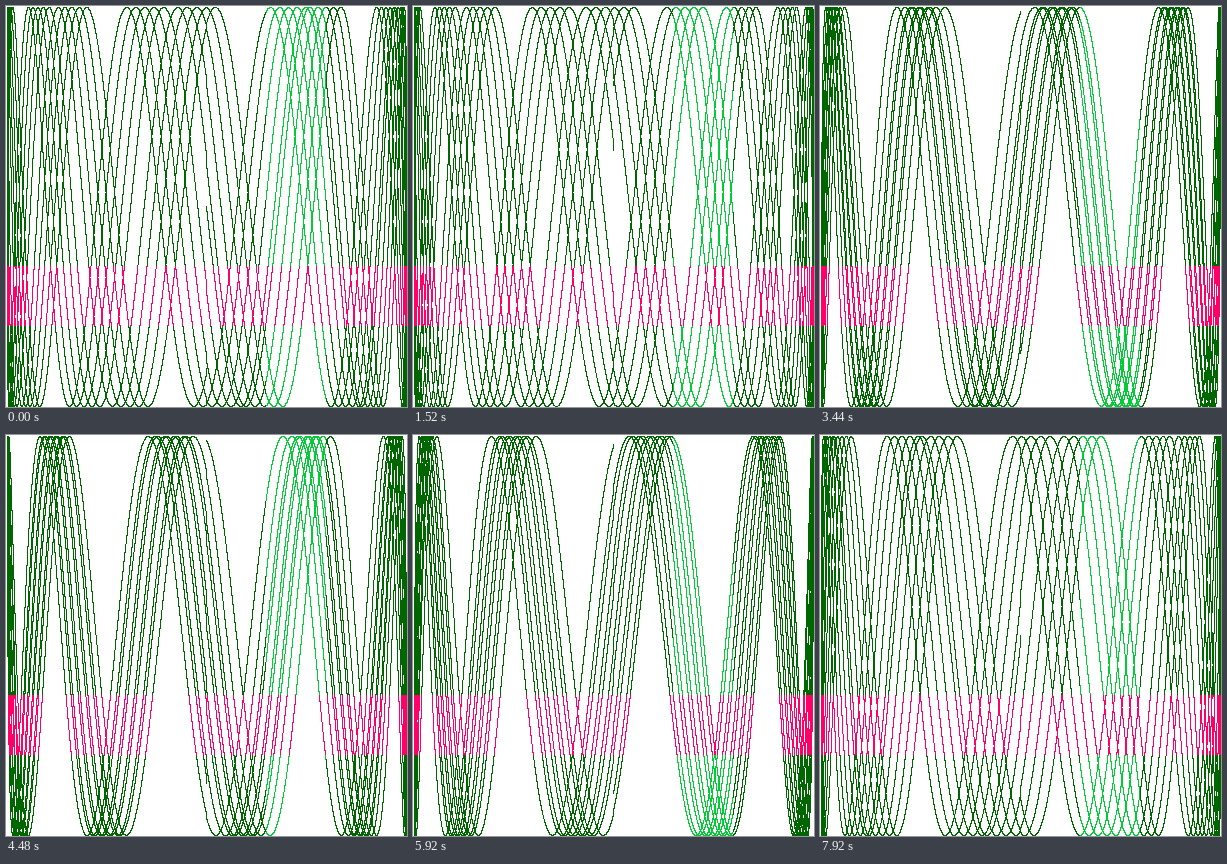
Animation of 401 by 401 pixels, one loop 8000 ms. Source, as an HTML page with a canvas:

```html
<!DOCTYPE html>
<html>
<head>
<meta charset="utf-8">
<style>
html, body { margin: 0; height: 100%; overflow: hidden; background: #fff; }
canvas { display: block; }
</style>
</head>
<body>
<canvas id="stage" width="401" height="401"></canvas>
<script>
const SIZE = 200, SIDE = 2 * SIZE + 1;
const CYCLES = 5, STEP = 0.0001, FREQ = 9.069904319694294;
const FRAME_MS = 80, FRAMES = 100, PHASE_STEP = 0.2;

const ctx = document.getElementById('stage').getContext('2d');
const image = ctx.createImageData(SIDE, SIDE);
const pixels = new Uint32Array(image.data.buffer);

// Colours in ABGR byte order
const WHITE = 0xffffffff, DARK = 0xff006600, LIGHT = 0xff33cc00, PINK = 0xff6600ff;

const toPixel = v => SIZE + Math.trunc(v * SIZE + 0.5);
const inBand = v => v >= 260 && v < 320;
const colorAt = (x, y) => inBand(y) ? PINK : inBand(x) ? LIGHT : DARK;

function draw(phase) {
  pixels.fill(WHITE);
  for (let t = 0; t < CYCLES * 2 * Math.PI; t += STEP) {
    const x = toPixel(Math.sin(t));
    const y = toPixel(Math.sin(t * FREQ + phase));
    pixels[y * SIDE + x] = colorAt(x, y);
  }
  ctx.putImageData(image, 0, 0);
}

let shown = -1;
function tick() {
  const frame = Math.floor(performance.now() / FRAME_MS) % FRAMES;
  if (frame !== shown) draw((shown = frame) * PHASE_STEP);
  requestAnimationFrame(tick);
}
tick();
</script>
</body>
</html>
```
